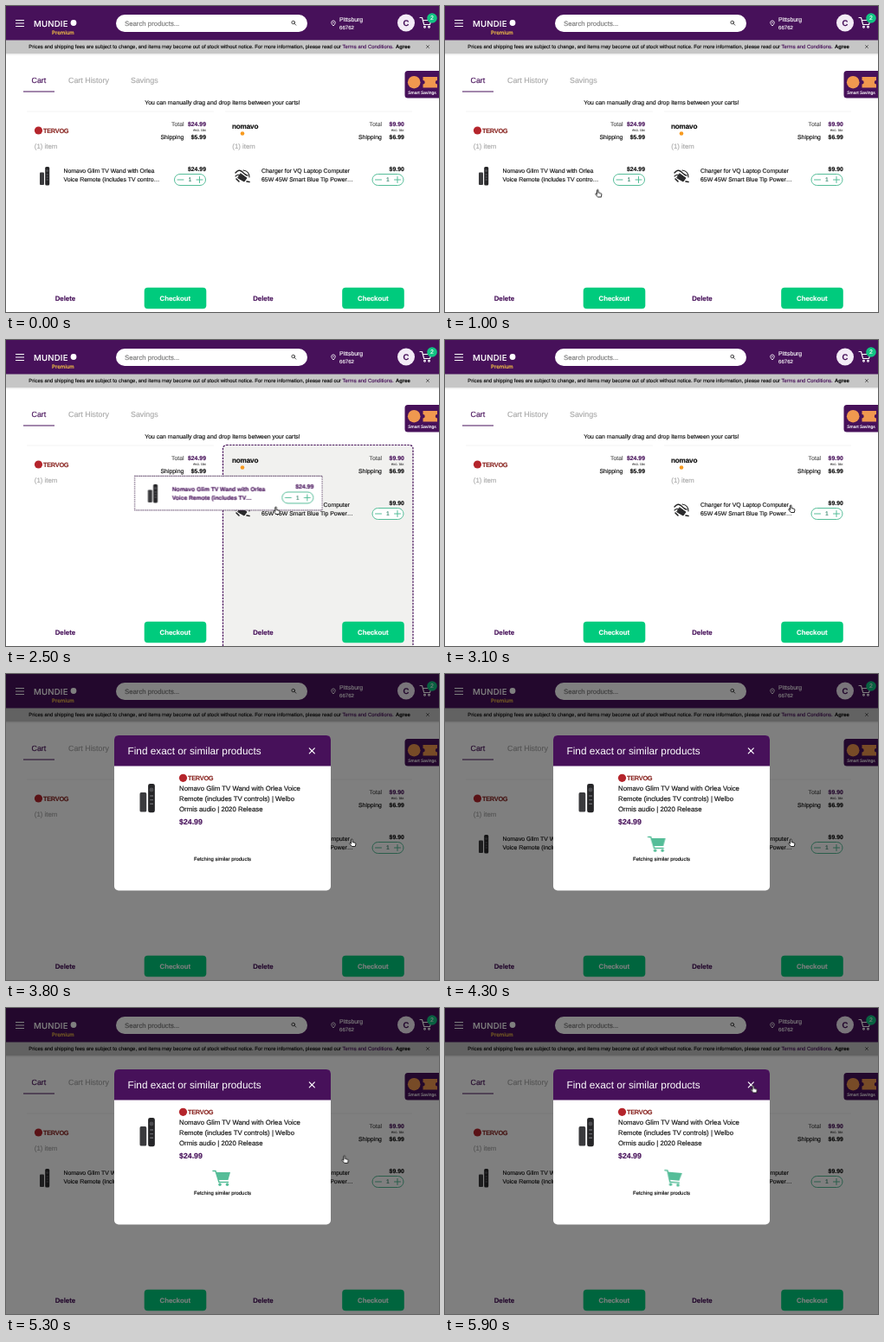
These frames come from a looping animation (500 px wide and 354 px high, 6000 ms). An HTML page:

```html
<!DOCTYPE html>
<html lang="en">
<head>
<meta charset="utf-8">
<title>Drag items between carts</title>
<style>
  :root { --purple: #47115a; --green: #00cb7d; --mint: #55bd98; --orange: #f0984f; }
  html, body { margin: 0; width: 100%; height: 100%; overflow: hidden; background: #fff; }
  svg { display: block; width: 500px; height: 354px; }
  text {
    font: 6.9px "Liberation Sans", Arial, sans-serif;
    text-rendering: geometricPrecision;
    color: #0c0c0c; fill: currentColor; stroke: currentColor; stroke-width: .14px;
  }
  .b { font-weight: 700; }
  .p { color: var(--purple); fill: currentColor; stroke: currentColor; }
  .w { color: #fff; }
  .g { color: #a8a8a8; }
  .d { color: #555; }
  .r { text-anchor: end; }
  .m { text-anchor: middle; }
  .s4 { font-size: 4.3px; }
  .s6 { font-size: 5.95px; }
  .s8 { font-size: 7.8px; }
  .s9 { font-size: 8.9px; }
  .s12 { font-size: 11.8px; stroke: none; }
  .line { fill: none; stroke-linecap: round; stroke-linejoin: round; }
  .zone { fill: #f1f1ef; stroke: var(--purple); stroke-width: 1.2px; stroke-dasharray: 2.4 1.2; }

  .anim { animation: 6s linear infinite; }
  .step { animation: 6s step-end infinite; }
  #cursor { animation-name: cursor; }
  #drag { animation-name: drag; }
  #card { animation-name: card; }
  #item { animation-name: item; }
  #zone1 { animation-name: zone1; }
  #zone2 { animation-name: zone2; }
  #shade { animation-name: fade; }
  #modal { animation-name: fade, pop; transform-origin: 250px 160px; }
  #loader { animation-name: ride; transform-origin: 248px 197px; }

  @keyframes cursor {
    0%, 8.3% { transform: translate(216px, 372px); }
    15.8%, 23.3% { transform: translate(177px, 216.5px); }
    28.3% { transform: translate(194.5px, 211px); }
    33.3% { transform: translate(212px, 206px); }
    41.7% { transform: translate(312.5px, 197px); }
    46.7%, 86.7% { transform: translate(400px, 195px); }
    95%, 100% { transform: translate(356.5px, 93.5px); }
  }
  @keyframes drag {
    0%, 23.3% { transform: translate(22.5px, 176px); }
    28.3% { transform: translate(40px, 169.6px); }
    33.3% { transform: translate(56px, 165px); }
    41.7% { transform: translate(148px, 156.8px); }
    46.7% { transform: translate(235px, 155px); animation-timing-function: ease-out; }
    51.7%, 100% { transform: translate(251px, 176px); }
  }
  @keyframes card { 0% { opacity: 0; } 24% { opacity: 1; } 51.6%, 100% { opacity: 0; } }
  @keyframes item { 0% { opacity: 1; } 24% { opacity: 0; } 68.3%, 100% { opacity: 1; } }
  @keyframes zone1 { 0% { opacity: 0; } 24% { opacity: 1; } 36.6%, 100% { opacity: 0; } }
  @keyframes zone2 { 0% { opacity: 0; } 36.6% { opacity: 1; } 51.6%, 100% { opacity: 0; } }
  @keyframes fade { 0%, 56% { opacity: 0; } 59.5%, 100% { opacity: 1; } }
  @keyframes pop { 0%, 56% { transform: scale(.95); } 59.5%, 100% { transform: none; } }
  @keyframes ride {
    0%, 64% { transform: translateX(-30px); opacity: 0; }
    67% { opacity: 1; }
    73%, 90% { transform: none; opacity: 1; animation-timing-function: ease-in; }
    98.3% { transform: translateX(14px) rotate(5deg); opacity: 1; }
    100% { transform: translateX(20px) rotate(6deg); opacity: 1; }
  }
</style>
</head>
<body>
<svg viewBox="0 0 500 354">
  <defs>
    <g id="qty">
      <rect x=".5" y=".5" width="36" height="13" rx="6.5" fill="#fff" stroke="var(--mint)"/>
      <path class="line" d="M4 7h7M26 7h7M29.5 3.5v7" stroke="var(--mint)"/>
      <text class="m" x="18.5" y="9.4" style="color:#2c7f64">1</text>
    </g>
    <g id="remote">
      <rect x="6.2" width="5" height="21.5" rx="1.5" fill="#262628"/>
      <rect y="6.5" width="5" height="14.5" rx="1" fill="#3a3a3d"/>
      <circle cx="8.7" cy="4.5" r="1.6" fill="#4c4c50"/>
      <path d="M7.6 9h2.4M7.6 12h2.4M7.6 15h2.4" stroke="#66666b" stroke-width=".9"/>
    </g>
    <g id="charger" class="line" stroke="#222">
      <path d="M1 5q4-5 8-1t6 4" stroke-width="1.4"/>
      <path d="M1 9q4-4 6 1M10 2q7 1 7 8" stroke-width="1.1"/>
      <path d="M7 6l7 5-3 4-7-4z" fill="#2b2b2d"/>
      <path d="M2 12l3 3M14 15l3 .5" stroke-width="1.6"/>
    </g>
    <g id="actions">
      <text class="b p s8" x="56.7" y="341">Delete</text>
      <rect x="159.7" y="325.7" width="71.6" height="24.6" rx="4" fill="var(--green)"/>
      <text class="b w s8 m" x="195.3" y="341">Checkout</text>
    </g>
    <g id="labels">
      <text class="d" x="191" y="139.2">Total</text>
      <text class="d s4 r" x="231" y="144.8">exc. tax</text>
      <text x="178.5" y="154">Shipping</text>
      <text class="g s8" x="32.8" y="164.7">(1) item</text>
    </g>
    <g id="shop">
      <circle cx="5" r="4.6" fill="#b5252c"/>
      <text class="b" x="10.5" y="2.7" style="font-size:7.4px;letter-spacing:-.3px;color:#8c2a26">TERVOG</text>
    </g>
  </defs>

  <rect width="500" height="354" fill="#fff"/>

  <g id="notice">
    <rect y="55" width="500" height="1.5" fill="#ececec"/>
    <rect y="39" width="500" height="16" fill="#c6c6c6"/>
    <text class="s6" x="26.3" y="49.2">Prices and shipping fees are subject to change, and items may become out of stock without notice. For more information, please read our <tspan class="p">Terms and Conditions.</tspan></text>
    <text class="b s6" x="450" y="49.2">Agree</text>
    <path d="M485.2 45.3l3.6 3.6m0-3.6l-3.6 3.6" stroke="#444" stroke-width=".8"/>
  </g>

  <g id="header">
    <rect width="500" height="39.5" fill="var(--purple)"/>
    <path d="M11 16.500h10M11 20h10M11 23.500h10" stroke="#fff"/>
    <text class="w" x="32" y="23.600" style="font:500 9.600px Inter,sans-serif;letter-spacing:.2px">MUNDIE</text>
    <circle cx="78" cy="19.500" r="3.400" fill="#fff"/>
    <text x="53" y="33.200" style="font:500 6.100px Inter,sans-serif;color:#f4c145">Premium</text>
    <rect x="127" y="10" width="221" height="20" rx="10" fill="#fff"/>
    <text class="s8" x="137" y="22.500" style="color:#777">Search products...</text>
    <g class="line" stroke="#333" stroke-width=".9">
      <circle cx="331.700" cy="19" r="1.800"/><path d="M333.100 20.400l1.700 1.700"/>
    </g>
    <path d="M378 23c-3.600-3.600-2.300-6 0-6s3.600 2.400 0 6z" fill="none" stroke="#fff" stroke-width=".9"/>
    <circle cx="378" cy="19.200" r=".7" fill="#fff"/>
    <text class="w" x="385" y="18.200">Pittsburg</text>
    <text class="w" x="385" y="26.600" style="font-size:6.100px">66762</text>
    <circle cx="462" cy="19.500" r="10" fill="#f3ebf6"/>
    <text class="b p m" x="462" y="22.900" style="font-size:9.500px">C</text>
    <g class="line" stroke="#fff" stroke-width="1.100">
      <path d="M478 13.500h2.500l2.200 8h6.800l1.500-5h-9.500"/>
      <circle cx="483.500" cy="24.300" r=".9"/><circle cx="488.500" cy="24.300" r=".9"/>
    </g>
    <circle cx="492" cy="14" r="5.800" fill="#12c483"/>
    <text class="w m" x="492" y="16.400">2</text>
  </g>

  <g id="tabs">
    <text class="p s9" x="29.500" y="89">Cart</text>
    <text class="g s9" x="72" y="89">Cart History</text>
    <text class="g s9" x="144" y="89">Savings</text>
    <path d="M20 99h36" stroke="var(--purple)" stroke-width="1.200"/>
    <text class="m" x="250" y="114.400">You can manually drag and drop items between your carts!</text>
  </g>

  <g id="savings">
    <path d="M500 75h-36q-3.500 0-3.500 3.500v24.500q0 3.500 3.500 3.500h36z" fill="var(--purple)"/>
    <circle cx="471.200" cy="88.200" r="7.300" fill="var(--orange)"/>
    <path d="M481.500 82h16.500v4a2.200 2.200 0 0 0 0 4.400v4h-16.500v-4a2.200 2.200 0 0 0 0-4.400z" fill="var(--orange)"/>
    <text class="w m" x="480.500" y="102" style="font-size:5px">Smart Savings</text>
  </g>

  <path d="M24 122h216M253 122h216" stroke="#f2f2f2" stroke-width=".8"/>
  <rect id="zone1" class="zone step" x="22.300" y="121.500" width="219.300" height="240" rx="4"/>
  <rect id="zone2" class="zone step" x="250.500" y="121.500" width="219.500" height="240" rx="4"/>

  <g id="cart1">
    <use href="#shop" x="32.500" y="144"/>
    <use href="#labels"/>
    <text class="b p r" x="231" y="139.200">$24.99</text>
    <text class="b r" x="231" y="154">$5.99</text>
    <g id="item" class="step">
      <use href="#remote" x="39" y="186"/>
      <text x="66.500" y="193.400">Nomavo Glim TV Wand with Orlea</text>
      <text x="66.500" y="203.400">Voice Remote (includes TV contro…</text>
      <text class="b r" x="231" y="191">$24.99</text>
      <use href="#qty" x="194" y="194"/>
    </g>
    <use href="#actions"/>
  </g>

  <g id="cart2">
    <text class="b" x="261" y="142" style="font-size:8.200px;letter-spacing:-.2px">nomavo</text>
    <circle cx="273" cy="147.500" r="2.300" fill="#f79a1f"/>
    <use href="#labels" x="228.500"/>
    <text class="b p r" x="459.800" y="139.200">$9.90</text>
    <text class="b r" x="459.800" y="154">$6.99</text>
    <use href="#charger" x="264" y="188"/>
    <text x="295" y="193.400">Charger for VQ Laptop Computer</text>
    <text x="295" y="203.400">65W 45W Smart Blue Tip Power…</text>
    <text class="b r" x="459.800" y="191">$9.90</text>
    <use href="#qty" x="422.500" y="194"/>
    <use href="#actions" x="228.500"/>
  </g>

  <g id="card" class="step">
    <g id="drag" class="anim">
      <rect x=".5" y=".5" width="217" height="39.500" fill="#fff" stroke="#3a1a46" stroke-dasharray="1.500 1"/>
      <use href="#remote" x="16" y="10"/>
      <text class="b p" x="44" y="17.800" style="font-size:6.700px">Nomavo Glim TV Wand with Orlea</text>
      <text class="b p" x="44" y="27.800" style="font-size:6.700px">Voice Remote (includes TV…</text>
      <text class="b p r" x="207.500" y="15.400">$24.99</text>
      <use href="#qty" x="170.500" y="18.500"/>
    </g>
  </g>

  <rect id="shade" class="anim" width="500" height="354" fill="#000" fill-opacity=".5"/>

  <g id="modal" class="anim">
    <rect x="125" y="71" width="250" height="179.500" rx="5" fill="#fff"/>
    <path d="M125 106.500v-30.500q0-5 5-5h240q5 0 5 5v30.500z" fill="var(--purple)"/>
    <text class="w s12" x="140.500" y="92.700">Find exact or similar products</text>
    <path class="line" d="M350.300 85.800l6 6m0-6l-6 6" stroke="#fff" stroke-width="1.200"/>
    <use href="#shop" x="199.500" y="120.300"/>
    <use href="#remote" transform="translate(154.500 127) scale(1.550)"/>
    <text class="s8" x="200" y="135">Nomavo Glim TV Wand with Orlea Voice</text>
    <text class="s8" x="200" y="147">Remote (includes TV controls) | Welbo</text>
    <text class="s8" x="200" y="159">Ormis audio | 2020 Release</text>
    <text class="b p" x="200" y="174" style="font-size:8.800px">$24.99</text>
    <g id="loader" class="anim" fill="var(--mint)">
      <path class="line" d="M239 188.500h3l4 13h10.500" stroke="var(--mint)" stroke-width="1.500"/>
      <path d="M242.500 190h16.500l-2.500 9h-11.300z"/>
      <circle cx="247" cy="204.300" r="1.700"/><circle cx="255.500" cy="204.300" r="1.700"/>
    </g>
    <text class="s6 m" x="250" y="216">Fetching similar products</text>
  </g>

  <path id="cursor" class="anim line" d="M-1.500 1v-4q0-1 .8-1t.8 1v2.500l3 .8q1 .3.8 1.500l-.6 2.700h-3.800l-2.600-3q-.6-1 .3-1.200z" style="fill:#fff" stroke="#111" stroke-width=".9"/>
</svg>
</body>
</html>
```
